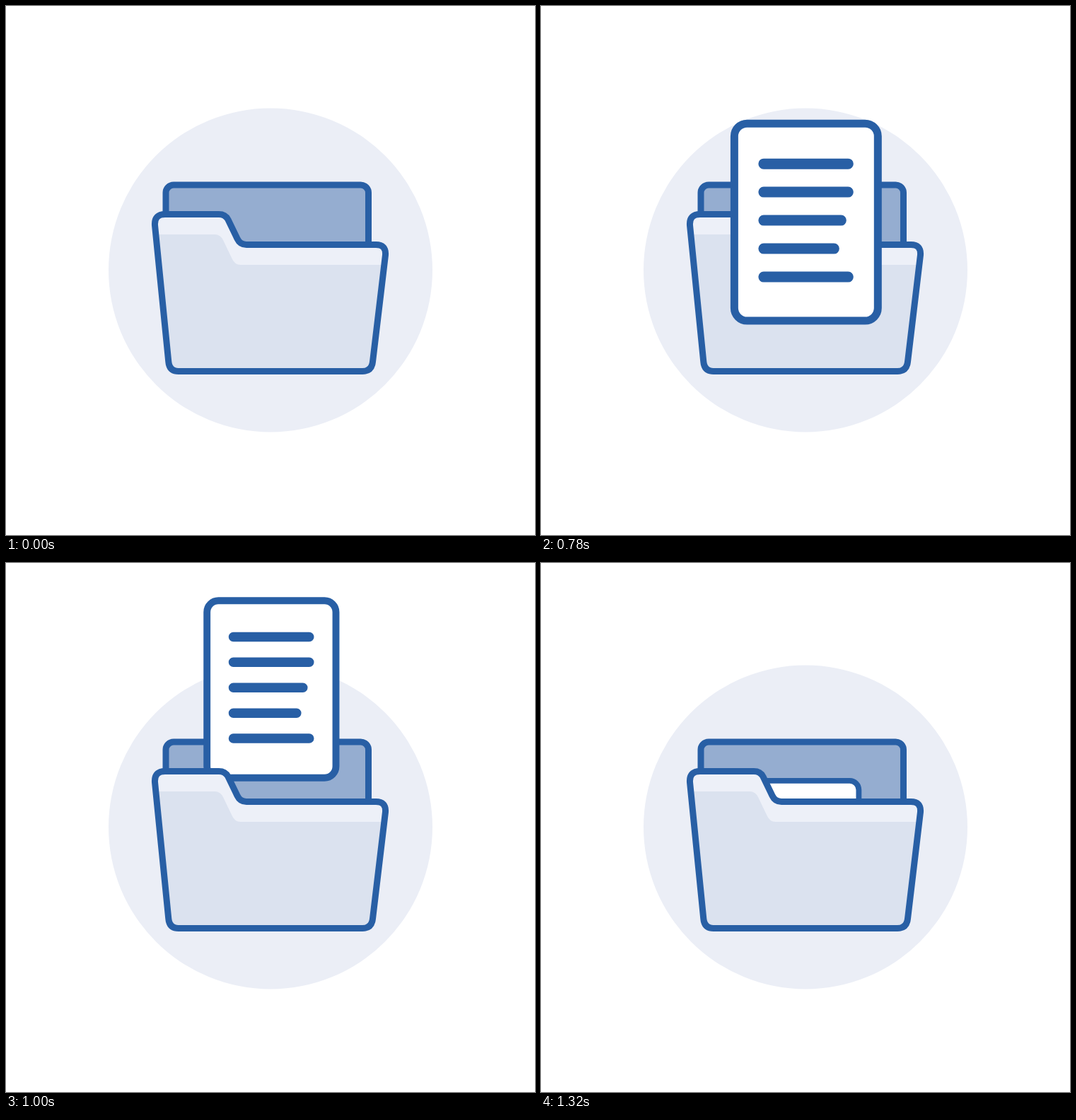
Recreate the animation shown at these times as an HTML page. Size 748 by 748 pixels, loop 2.42 s.

```html
<!DOCTYPE html>
<html lang="en">
<head>
<meta charset="utf-8">
<title>Document into folder</title>
<style>
  html, body { margin: 0; width: 100%; height: 100%; overflow: hidden; background: #fff; }
  svg { display: block; width: 100%; height: 100%; }
  .line { stroke: #285fa5; stroke-width: 9; }
</style>
</head>
<body>
<svg viewBox="0 0 748 748">
  <defs>
    <path id="shape" d="M225 294.5H301Q310 294.5 314 302L327 329Q331 337.5 340 337.5H523Q537.5 337.5 536.5 352L518.5 503Q517 516.5 504 516.5H244Q231 516.5 229.8 503L210.5 310Q209.5 294.5 225 294.5Z"/>
    <clipPath id="inside"><use href="#shape"/></clipPath>
  </defs>
  <circle cx="374" cy="373.5" r="229" fill="#ebeef6"/>
  <rect class="line" x="226" y="253" width="286.5" height="160" rx="11" fill="#95add0"/>
  <g id="front">
    <use href="#shape" fill="#edf0f8"/>
    <path clip-path="url(#inside)" fill="#dbe2ef" d="M200 323H295Q303 323 307 331L319 356Q323 366 332 366H545V525H200Z"/>
    <use href="#shape" class="line" fill="none"/>
  </g>
  <g id="doc" stroke="#285fa5">
    <rect x="-101.5" y="-139.5" width="203" height="279" rx="18" fill="#fff" stroke-width="11"/>
    <path d="M-60-82.5H59.5M-60-42.5H59.5M-60-2.5H49.5M-60 37.5H39.5M-60 77.5H59.5" stroke-width="15" stroke-linecap="round"/>
  </g>
</svg>
<script>
const LOOP = 2420, STEP = 20, START = 600, LEG = 360;
const front = document.getElementById('front');
const doc = document.getElementById('doc');

// Centre x, centre y and scale: below the stage, at the top, in the folder
const poses = [[373.8, 939.5, 1.315], [375.1, 149.5, 0.922], [377.3, 407, 0.71]];

const bezier = (a, b, s) => 3 * a * s * (1 - s) ** 2 + 3 * b * s * s * (1 - s) + s ** 3;

// Same curve as the CSS "ease" keyword
function ease(x) {
  let lo = 0, hi = 1;
  for (let i = 0; i < 30; i++) {
    const mid = (lo + hi) / 2;
    if (bezier(0.25, 0.25, mid) < x) lo = mid; else hi = mid;
  }
  return bezier(0.1, 1, lo);
}

function draw(now) {
  const t = Math.floor((now % LOOP) / STEP) * STEP;
  const p = Math.min(2, Math.max(0, (t - START) / LEG));
  const leg = p < 1 ? 0 : 1;
  const k = ease(p - leg);
  const [x, y, scale] = poses[leg].map((v, i) => v + (poses[leg + 1][i] - v) * k);
  doc.setAttribute('transform', `translate(${x} ${y}) scale(${scale})`);
  if (leg) front.before(doc); else front.after(doc);
}

const begin = performance.now();
function tick() {
  draw(performance.now() - begin);
  requestAnimationFrame(tick);
}
tick();
</script>
</body>
</html>
```
